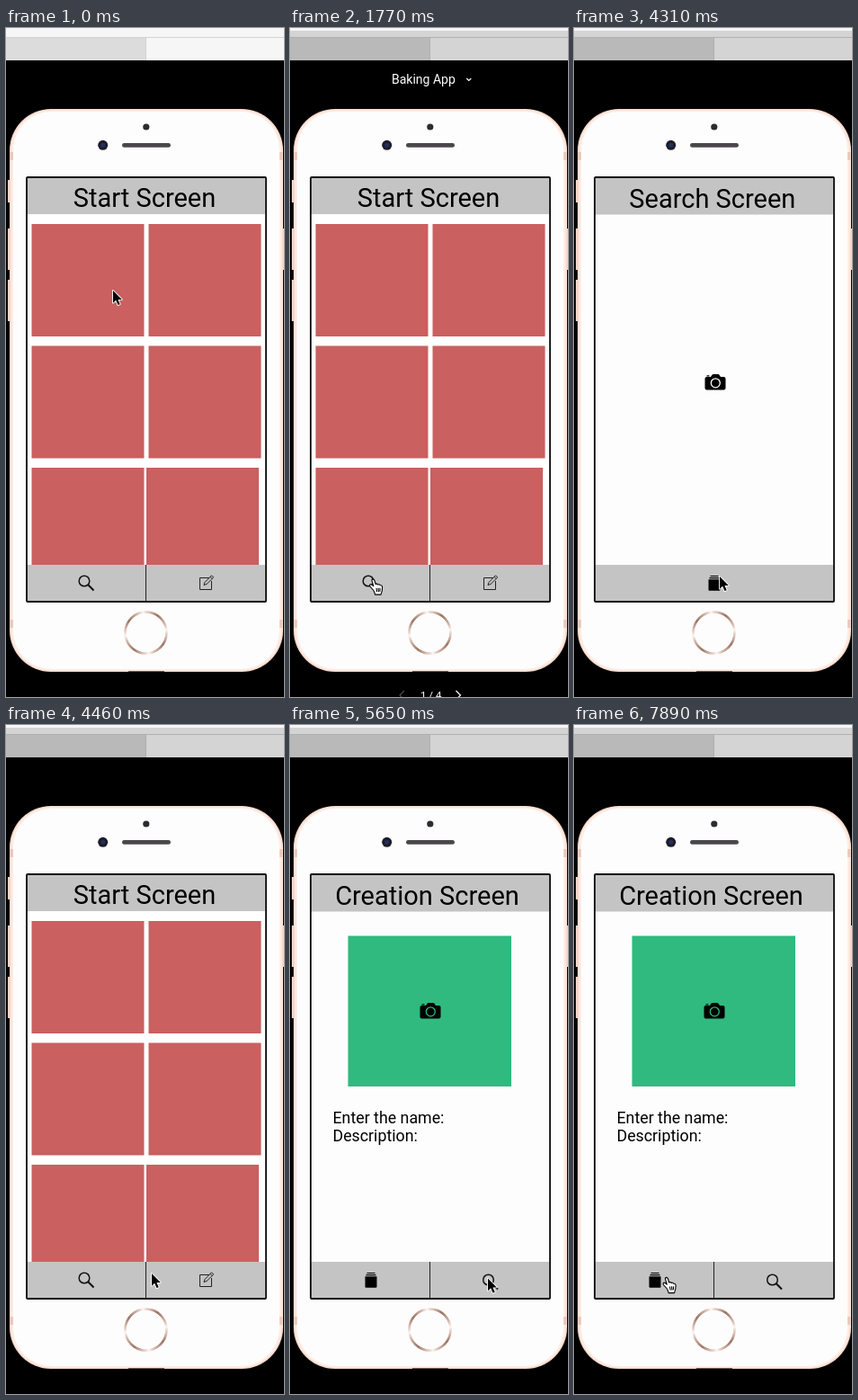
An HTML page that plays this animation: 309x744 px, repeating every 8000 ms.

```html
<!DOCTYPE html>
<html lang="en">
<head>
<meta charset="utf-8">
<title>App prototype</title>
<style>
  html, body { margin: 0; width: 100%; height: 100%; overflow: hidden; background: #000; }
  svg { display: block; position: absolute; left: 0; top: 0; }
  text { font-family: Roboto, sans-serif; }
  .title { font-size: 29px; text-anchor: middle; }
  .form { font-size: 17.8px; }
  .line { fill: none; stroke: #fff; stroke-width: 1.2; }
  .home {
    position: absolute; left: 131px; top: 648px; width: 49px; height: 49px; border-radius: 50%;
    background: repeating-conic-gradient(from 35deg, #9c7463, #d9bfb3 9%, #fbf5f2 13%, #d9bfb3 18%, #9c7463 25%);
    -webkit-mask: radial-gradient(circle, transparent 21.3px, #000 22px);
    mask: radial-gradient(circle, transparent 21.3px, #000 22px);
  }
</style>
</head>
<body>
<svg width="309" height="744" viewBox="0 0 309 744">
  <defs>
    <g id="search" fill="none" stroke="#111" stroke-width="1.5">
      <circle cx="6.5" cy="6.5" r="5.8"/><path d="M10.8 10.8L17 17" stroke-width="2"/>
    </g>
    <g id="edit" fill="none" stroke="#222">
      <path d="M11 3.5H.5V16.5H13.5V7"/>
      <path d="M5 11.5L6 8.5 13.5.8 15.7 3 8 10.5ZM12 2.3L14.2 4.5"/>
    </g>
    <path id="deck" d="M0 5H13V16.5Q13 17.5 12 17.5H1Q0 17.5 0 16.5ZM1 2.7H12V4H1ZM2 .7H11V1.8H2Z"/>
    <g id="camera">
      <path d="M2 3H6.5L8 .8Q8.5 0 9.5 0H14.5Q15.5 0 16 .8L17.5 3H21Q23 3 23 5V15.5Q23 17.5 21 17.5H2Q0 17.5 0 15.5V5Q0 3 2 3ZM2 1.2H5V2.4H2Z"/>
      <circle cx="11.8" cy="9.8" r="5" fill="none" stroke="var(--ring)" stroke-width="1.3"/>
    </g>
    <path id="mark" d="M0 0H4V9H0Z" fill="#eccabc"/>
  </defs>

  <g id="browser">
    <rect width="309" height="36" fill="#f6f6f6"/>
    <rect id="strip" y="3" width="309" height="33"/>
    <rect id="tab" y="11" width="155" height="25"/>
    <path id="rule" d="M0 10.5H309M155.5 11V36"/>
  </g>

  <g id="chrome" fill="#fff">
    <text x="113" y="62" font-size="14">Baking App</text>
    <path class="line" d="M196.300 56L198.800 58.500 201.300 56"/>
    <text id="page" x="145" y="746" font-size="11.500"></text>
    <path class="line" id="prev" d="M127 737L122 742 127 747"/>
    <path class="line" d="M184.500 737L189.500 742 184.500 747"/>
  </g>

  <g id="phone">
    <path d="M3 169V194M3 223V269M3 280V326M308 223V269" stroke="#f3d3c5" stroke-width="2"/>
    <rect x="4" y="90" width="304" height="626" rx="46" fill="#f6d9cc"/>
    <rect x="5.500" y="91.200" width="301" height="623.600" rx="45" fill="#ffece3"/>
    <use href="#mark" x="4" y="138"/><use href="#mark" x="304" y="138"/>
    <use href="#mark" x="4" y="658"/><use href="#mark" x="304" y="658"/>
    <rect x="8" y="93" width="296" height="620" rx="43" fill="#fdfdfe"/>
    <path d="M136 715.500H176" stroke="#6d5850"/>
    <circle cx="155.800" cy="110" r="3.600" fill="#2c2b2f"/>
    <circle cx="107.700" cy="130.300" r="5.500" fill="#1d1c26"/>
    <circle cx="107.700" cy="130.300" r="2.500" fill="#20305f"/>
    <rect x="129" y="128" width="54" height="4.800" rx="2.400" fill="#4a474a"/>
  </g>

  <rect x="23" y="166" width="266" height="472" fill="#fdfdfd"/>
  <path d="M23 166H289V207.500H23ZM23 597H289V638H23Z" fill="#c4c4c4"/>

  <g class="screen">
    <text class="title" x="154" y="199">Start Screen</text>
    <path d="M24 207H288V597H24Z" fill="#fff"/>
    <path id="tiles" fill="#ca6060"/>
    <use href="#search" x="80.500" y="608.500"/>
    <use href="#edit" x="215" y="608"/>
    <path d="M155.500 597V638" stroke="#222"/>
  </g>
  <g class="screen" style="--ring:#fff">
    <text class="title" x="153.800" y="200">Search Screen</text>
    <use href="#camera" x="145.500" y="385"/>
    <use href="#deck" x="149.500" y="608.300"/>
  </g>
  <g class="screen" style="--ring:#30ba80">
    <text class="title" x="152.500" y="200">Creation Screen</text>
    <rect x="64.500" y="234.500" width="181.500" height="167.500" fill="#30ba80"/>
    <use href="#camera" x="144.500" y="309"/>
    <text class="form" x="47.500" y="443">Enter the name:</text>
    <text class="form" x="47.500" y="463">Description:</text>
    <use href="#deck" x="83.500" y="608.300"/>
    <use href="#search" x="214" y="610.500"/>
    <path d="M155.500 597V638" stroke="#222"/>
  </g>
  <rect x="23" y="166" width="266" height="472" rx="1" fill="none" stroke="#0c0c0c" stroke-width="1.800"/>
</svg>
<div class="home"></div>
<svg width="309" height="744" viewBox="0 0 309 744">
  <g id="cursor" stroke-linejoin="round">
    <path id="arrow" transform="scale(.88)" d="M0 0V15.500L3.600 12.200 6.200 18.300 8.800 17.200 6.200 11.300H11.200Z" stroke="#fff" stroke-width="2" paint-order="stroke"/>
    <path id="hand" transform="translate(-4.500 1.500)" fill="#fff" stroke="#000" stroke-width="1.100"
      d="M4.500 12.500L1.300 9Q-.2 7 1.300 6.200 2.600 5.800 4.800 8.200L3 2.200Q2.800.5 4.200.4 5.500.4 6 2L7.200 6Q8.900 5 9.700 6.600 11.400 5.700 12.200 7.300 14.300 6.900 14.600 9.200 14.900 13 13 17.600H6.700Q6 14.600 4.500 12.500ZM8 10.500L8.700 14.500M10 10.300L10.500 14.500M12 10.200V14.200"/>
  </g>
</svg>
<script>
const LOOP = 8000, STEP = 148;
const $ = id => document.getElementById(id);
const groups = document.querySelectorAll('.screen');

// The pointer glides along curves and rests in between.
const origin = [119, 292];
const moves = [
  { start: 290, steps: 8, bend: [175, 788], to: [92.5, 611] },
  { start: 3120, steps: 4, bend: [130, 614], to: [162, 610] },
  { start: 5050, steps: 3, bend: [190, 614], to: [220, 615.5] },
  { start: 6400, steps: 5, bend: [156, 639], to: [93, 615] },
  { start: 7440, steps: 4, bend: [114, 612], to: [103, 612.5] }
];
// "links" is where the clickable part of the footer begins.
const screens = [
  { start: 0, group: 0, links: 23 },
  { start: 2670, group: 1, links: 145 },
  { start: 4460, click: 4310, group: 0, links: 23 },
  { start: 5650, group: 2, links: 23 }
];

const latest = (list, t) => list.filter(item => t >= item.start).pop();
const progress = (t, start, steps) =>
  Math.max(0, Math.min(1, (Math.floor((t - start) / STEP) + 1) / steps));
const ease = p => p * p * (3 - 2 * p);
const show = (node, visible) => node.style.display = visible ? '' : 'none';

function pointerAt(t) {
  const move = latest(moves, t);
  if (!move) return origin;
  const from = moves[moves.indexOf(move) - 1]?.to ?? origin;
  const p = ease(progress(t, move.start, move.steps)), q = 1 - p;
  return from.map((v, i) => q * q * v + 2 * p * q * move.bend[i] + p * p * move.to[i]);
}

// After a click the arrow returns until the pointer moves again.
function isPointing(t, x, y) {
  const moved = latest(moves, t)?.start ?? 0;
  const clicked = screens.some(s => s.start && (s.click ?? s.start) <= t && (s.click ?? s.start) > moved);
  return !clicked && y > 597 && y < 638 && x > latest(screens, t).links;
}

function tilePath() {
  let d = '';
  for (let row = 0; row < 3; row++) {
    for (let col = 0; col < 2; col++) {
      const x = 28.5 + col * (row < 2 ? 130 : 127.5), y = 218 + row * 135.5;
      d += `M${x} ${y}h125V${Math.min(y + 125, 597)}h-125Z`;
    }
  }
  return d;
}

function render(t) {
  const [x, y] = pointerAt(t);
  const pointing = isPointing(t, x, y);
  $('cursor').setAttribute('transform', `translate(${x} ${y})`);
  show($('arrow'), !pointing);
  show($('hand'), pointing);

  const active = latest(screens, t).group;
  groups.forEach((group, i) => show(group, i === active));

  $('chrome').style.opacity = progress(t, 1470, 3) - progress(t, 2670, 2) ** 1.3;
  $('page').textContent = active ? '3 / 4' : '1 / 4';
  $('prev').style.opacity = active ? 1 : .3;

  const focused = t >= 1470;
  $('strip').style.fill = focused ? '#d4d4d4' : '#f6f6f6';
  $('tab').style.fill = focused ? '#b9b9b9' : '#dcdcdc';
  $('rule').style.stroke = focused ? '#b0b0b0' : '#d2d2d2';
}

function tick() {
  render(performance.now() % LOOP);
  requestAnimationFrame(tick);
}
$('tiles').setAttribute('d', tilePath());
tick();
</script>
</body>
</html>
```
